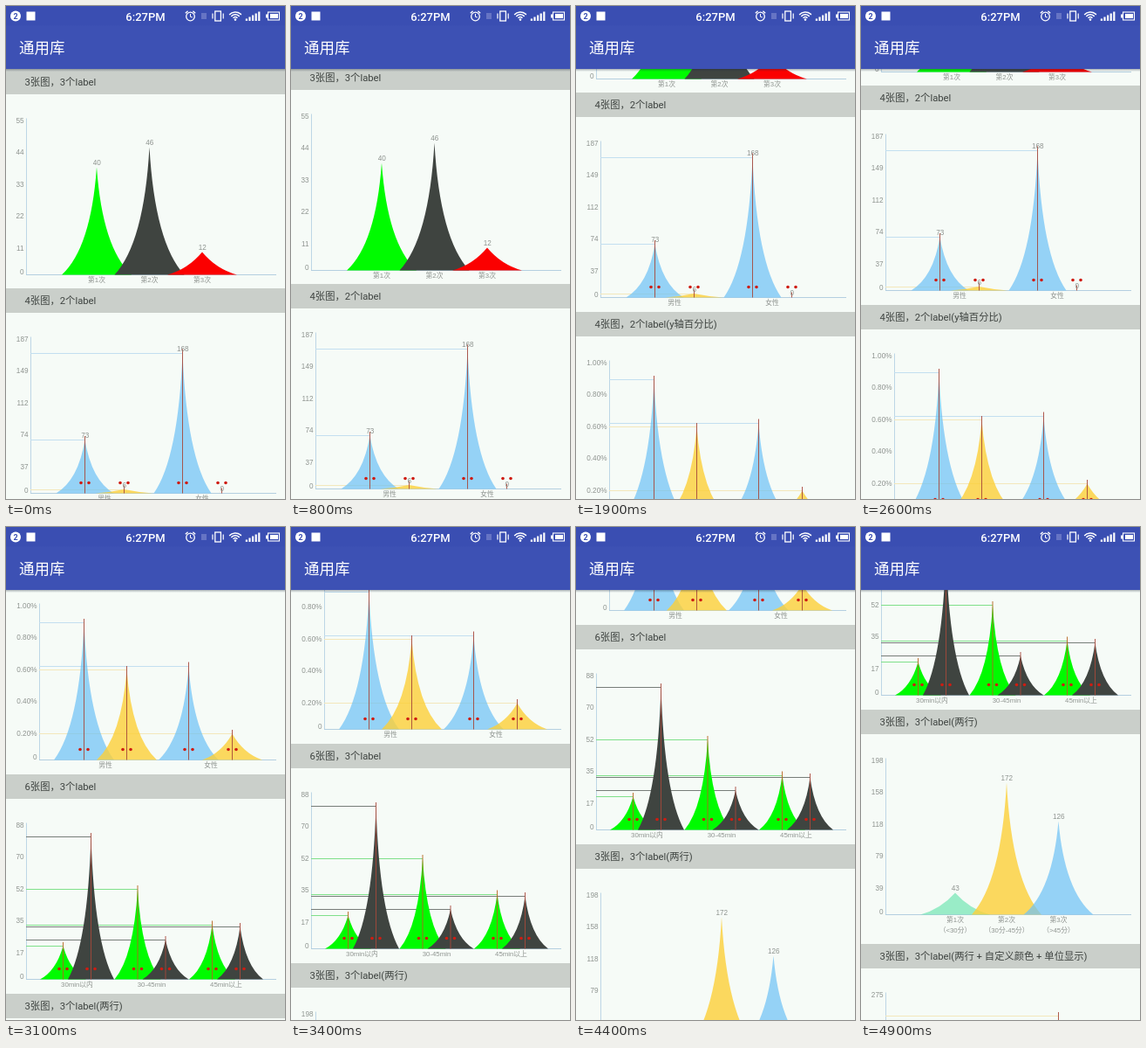
Recreate the animation shown at these times as an HTML page with a canvas. Size 320 by 564 pixels, loop 5 s.

```html
<!DOCTYPE html>
<html lang="zh-CN">
<head>
<meta charset="utf-8">
<title>通用库</title>
<style>
html, body { margin: 0; width: 100%; height: 100%; overflow: hidden; background: #f6fbf7; }
#stage { position: relative; width: 320px; height: 564px; overflow: hidden; }
#page, #bar, canvas { position: absolute; left: 0; top: 0; }
#page { width: 320px; height: 1480px; will-change: transform; }
#bar { width: 320px; height: 72px; background: linear-gradient(#3a4eb2 22px, #3d51b4 23px); }
#bar::after { content: ""; position: absolute; top: 72px; width: 320px; height: 3px;
  background: linear-gradient(rgba(30, 40, 60, .35), rgba(30, 40, 60, 0)); }
span { position: absolute; white-space: pre; line-height: 1; }
.mid { transform: translate(-50%, -50%); }
.end { transform: translate(-100%, -50%); }
.start { transform: translate(0, -50%); }
.note { font: 8.2px/1 "Liberation Sans", "Noto Sans CJK SC", sans-serif; color: #8f9490; }
.cjk { font-size: 7.8px; }
.head { font: 11.3px/1 Roboto, "Noto Sans CJK SC", "Noto Sans CJK", sans-serif; color: #3f4441; }
.title { font: 17.5px/1 Roboto, "Noto Sans CJK SC", "Noto Sans CJK", sans-serif; color: #fff; }
.time { font: 500 13px/1 Roboto, sans-serif; color: #fff; }
.badge { font: 700 9px/1 Roboto, sans-serif; color: #3a4eb2; }
</style>
</head>
<body>
<div id="stage">
  <div id="page"></div>
  <div id="bar"></div>
</div>
<script>
const page = document.getElementById('page');
const bar = document.getElementById('bar');

const GREEN = '#00fb00', DARK = '#3f4440', RED = '#fb0000', BAND = '#cacfca';
const BLUE = 'rgba(112,195,246,.72)', YELLOW = 'rgba(253,208,56,.8)', MINT = 'rgba(95,226,170,.62)';

function makeCanvas(parent, w, h) {
  const c = document.createElement('canvas');
  const k = window.devicePixelRatio || 1;
  c.width = w * k;
  c.height = h * k;
  c.style.width = w + 'px';
  c.style.height = h + 'px';
  parent.append(c);
  const g = c.getContext('2d');
  g.scale(k, k);
  return g;
}

function text(parent, str, x, y, cls) {
  const s = document.createElement('span');
  s.textContent = str;
  s.className = cls;
  s.style.left = x + 'px';
  s.style.top = y + 'px';
  parent.append(s);
}

function line(g, x1, y1, x2, y2, color, width = 1) {
  g.strokeStyle = color;
  g.lineWidth = width;
  g.beginPath();
  g.moveTo(x1, y1);
  g.lineTo(x2, y2);
  g.stroke();
}

function arc(g, x, y, r, a = 0, b = Math.PI * 2) {
  g.beginPath();
  g.arc(x, y, r, a, b);
}

// Charts: peaks are [center, height]; colors repeat along the row.
const charts = [
  { top: 73, title: '3张图，3个label', axis: 23, ticks: [55, 44, 33, 22, 11, 0],
    half: 40, peaks: [[104, 123], [164.5, 146], [225, 26]], colors: [GREEN, DARK, RED],
    values: [40, 46, 12], names: [[104, '第1次'], [164.5, '第2次'], [225, '第3次']] },
  { top: 323, title: '4张图，2个label', axis: 28, ticks: [187, 149, 112, 74, 37, 0],
    half: 33, peaks: [[90.5, 61], [135.5, 4.5], [202.5, 160.5], [247.5, 0]], colors: [BLUE, YELLOW],
    values: [73, 6, 168, 0], names: [[113, '男性'], [225, '女性']], guides: true },
  { top: 574, title: '4张图，2个label(y轴百分比)', axis: 38,
    ticks: ['1.00%', '0.80%', '0.60%', '0.40%', '0.20%', 0],
    half: 34.5, peaks: [[89.5, 157], [138.5, 103], [209.5, 107.5], [259.5, 30]], colors: [BLUE, YELLOW],
    names: [[114, '男性'], [235, '女性']], guides: true },
  { top: 825, title: '6张图，3个label', axis: 23, ticks: [88, 70, 52, 35, 17, 0],
    half: 26.5, peaks: [[65.5, 38], [97.5, 163], [151, 103], [183, 45], [236.5, 62.5], [268.5, 60]],
    colors: [GREEN, DARK], names: [[81.5, '30min以内'], [167, '30-45min'], [252.5, '45min以上']], guides: true },
  { top: 1076, title: '3张图，3个label(两行)', axis: 28, ticks: [198, 158, 118, 79, 39, 0],
    half: 40, peaks: [[108, 25], [167, 151], [226.5, 107]], colors: [MINT, YELLOW, BLUE],
    values: [43, 172, 126], names: [[108, '第1次', '（<30分）'], [167, '第2次', '（30分-45分）'], [226.5, '第3次', '（>45分）']] },
  { top: 1344, title: '3张图，3个label(两行 + 自定义颜色 + 单位显示)', axis: 28, ticks: [275],
    half: 40, peaks: [[226.5, 152]], colors: [YELLOW], names: [], guides: true }
];

const guideColor = { [BLUE]: '#c3dff0', [YELLOW]: '#f3e7bb', [GREEN]: '#7fe08a', [DARK]: '#777d79' };

// Tall peaks end in a thin cusp, low ones stay broad.
function spike(g, x, base, half, h, color) {
  const cx = half * Math.min(.5, .1 + 8 / h), cy = base - h * .25;
  g.fillStyle = color;
  g.beginPath();
  g.moveTo(x - half, base);
  g.quadraticCurveTo(x - cx, cy, x, base - h);
  g.quadraticCurveTo(x + cx, cy, x + half, base);
  g.fill();
}

function drawChart(g, c) {
  const base = c.top + 234.5;
  const tint = i => c.colors[i % c.colors.length];
  g.fillStyle = BAND;
  g.fillRect(0, c.top, 320, 28);
  text(page, c.title, 21.5, c.top + 14.5, 'head start');

  line(g, c.axis + .5, base - 179, c.axis + .5, base, '#bdd6e6');
  line(g, c.axis, base, 310, base, '#b4cfe0');
  c.ticks.forEach((t, i) =>
    text(page, t, c.axis - 2.5, base - (i < 5 ? 176 - 36.5 * i : 3), 'note end'));

  if (c.guides) c.peaks.forEach(([x, h], i) => {
    const y = Math.floor(base - h) + .5;
    if (h) line(g, c.axis, y, x, y, guideColor[tint(i)]);
  });
  c.peaks.forEach(([x, h], i) => {
    if (h) spike(g, x, base, c.half, h, tint(i));
  });
  if (c.guides) c.peaks.forEach(([x, h], i) => {
    line(g, x, base - Math.max(h + 4.5, 6), x, base, tint(i) === GREEN ? '#b5651f' : '#a8493a', .9);
    g.fillStyle = '#cf1c12';
    for (const d of [-4.5, 4.5]) {
      arc(g, x + d, base - 12, 1.8);
      g.fill();
    }
  });

  (c.values || []).forEach((v, i) =>
    text(page, v, c.peaks[i][0] + .3, base - c.peaks[i][1] - 4.5, 'note mid'));
  for (const [x, ...rows] of c.names)
    rows.forEach((r, i) => text(page, r, x, base + 6.5 + 11.5 * i, 'note cjk mid'));
}

function drawStatus(g) {
  g.fillStyle = g.strokeStyle = '#fff';
  arc(g, 11, 11.5, 6);
  g.fill();
  g.fillRect(23.5, 6.5, 10, 10);

  // alarm clock
  g.lineWidth = 1.3;
  arc(g, 211.5, 12, 4.8);
  g.stroke();
  line(g, 211.5, 9, 211.5, 12.3, '#fff');
  line(g, 211.5, 12.3, 213.8, 13, '#fff');
  line(g, 205.8, 8.2, 208.6, 5.8, '#fff', 1.4);
  line(g, 214.4, 5.8, 217.2, 8.2, '#fff', 1.4);

  g.fillStyle = '#6674c4';
  g.fillRect(224, 8, 6, 7);

  // vibrate
  g.lineWidth = 1.3;
  g.strokeRect(239.8, 6, 6.6, 11);
  for (const x of [237, 249.2]) line(g, x, 8.5, x, 14.5, '#fff', 1.2);

  // wifi
  g.lineWidth = 1.5;
  for (const r of [3.3, 6.2, 9.1]) {
    arc(g, 263, 16, r, -Math.PI * .77, -Math.PI * .23);
    g.stroke();
  }
  g.fillStyle = '#fff';
  arc(g, 263, 15.6, 1.3);
  g.fill();

  for (let i = 0; i < 5; i++) g.fillRect(274.8 + i * 3.6, 14.5 - i * 2, 2.2, 2.5 + i * 2);

  // battery
  g.lineWidth = 1.1;
  g.strokeRect(300.5, 7, 13, 9);
  g.fillRect(298, 9.5, 2, 4);
  g.fillRect(303, 9, 9, 5);
}

const art = makeCanvas(page, 320, 1480);
art.fillStyle = BAND;
art.fillRect(0, 0, 320, charts[0].top);
charts.forEach(c => drawChart(art, c));

drawStatus(makeCanvas(bar, 320, 72));
text(bar, '2', 11, 11.7, 'badge mid');
text(bar, '6:27PM', 160, 12, 'time mid');
text(bar, '通用库', 15, 48.5, 'title start');

// Scroll keys: [time, offset]
const keys = [[0, 0], [700, 0], [1300, 98], [1900, 224], [2350, 232], [2600, 232],
  [3100, 542], [3550, 583], [4000, 584], [4150, 587], [4600, 824], [4900, 867], [5000, 867]];

const slope = i => (keys[i + 1][1] - keys[i][1]) / (keys[i + 1][0] - keys[i][0]);

// Harmonic mean of neighbouring slopes keeps the curve from overshooting.
function tangent(i) {
  if (i === 0 || i === keys.length - 1) return 0;
  const a = slope(i - 1), b = slope(i);
  return a * b > 0 ? 2 * a * b / (a + b) : 0;
}

function scrollAt(t) {
  let i = 0;
  while (i < keys.length - 2 && t >= keys[i + 1][0]) i++;
  const [t0, y0] = keys[i], [t1, y1] = keys[i + 1];
  const d = t1 - t0, u = (t - t0) / d, v = 1 - u;
  return y0 * (1 + 2 * u) * v * v + y1 * u * u * (3 - 2 * u) +
    d * u * v * (v * tangent(i) - u * tangent(i + 1));
}

const LOOP = 5000, STEP = 100;
const start = performance.now();

function frame() {
  const t = (performance.now() - start) % LOOP;
  const y = Math.round(scrollAt(Math.floor(t / STEP) * STEP));
  page.style.transform = `translateY(${-y}px)`;
  requestAnimationFrame(frame);
}
frame();
</script>
</body>
</html>
```
